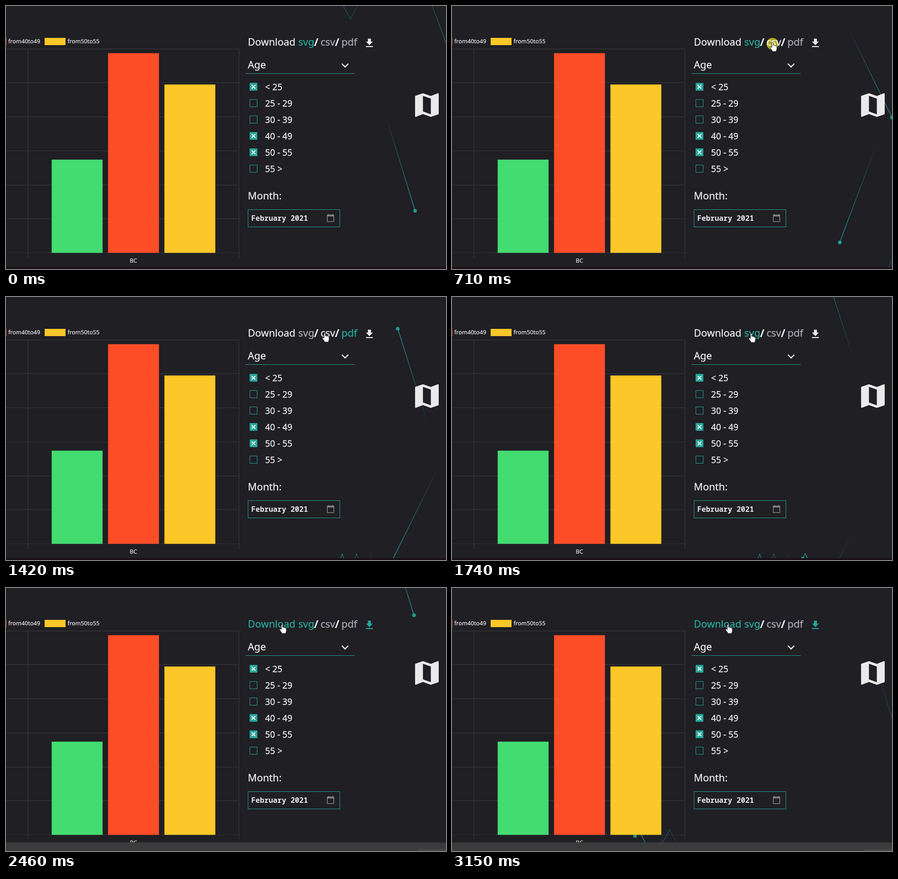
Write an HTML page with a canvas that moves like this. It is 968x578 px and loops after 3.22 s.

```html
<!DOCTYPE html>
<html lang="en">
<head>
<meta charset="utf-8">
<title>Chart download panel</title>
<style>
  html, body { margin: 0; width: 100%; height: 100%; overflow: hidden; background: #1f1f24; }
  canvas, svg { position: absolute; left: 0; top: 0; width: 968px; height: 578px; }
  text { font-family: "Noto Sans", "Open Sans", sans-serif; fill: #ececec; color: #ececec; stroke: currentColor; stroke-width: .35px; white-space: pre; }
  .big { font-size: 22px; }
  .slash { font-size: 24px; font-weight: 600; stroke: none; }
  .item { font-size: 19.2px; }
  .small { font-size: 12.7px; stroke-width: .2px; }
  .month { font: 600 16px "Noto Sans Mono", "DejaVu Sans Mono", monospace; stroke: none; }
  .icon { fill: #ececec; }
  .grid { stroke: #3b3b40; fill: none; }
  .teal { stroke: #26a69a; fill: none; }
  #click { mix-blend-mode: screen; }
</style>
</head>
<body>
<canvas id="trails" width="968" height="578"></canvas>
<svg viewBox="0 0 968 578">
  <path class="grid" d="M0 94.5H513M0 168.5H513M0 243.5H513M0 318.5H513M0 393.5H513M0 467.5H513M48.5 95V553M512.5 95V553"/>
  <path class="grid" d="M0 542.5H513" opacity=".7"/>
  <rect x="100.5" y="337.7" width="112" height="204.8" fill="#43dc71"/>
  <rect x="224.5" y="103.7" width="112" height="438.800" fill="#fd4d27"/>
  <rect x="348.5" y="172.500" width="112" height="370" fill="#fcc728"/>
  <rect x="0" y="70" width="1" height="16" fill="#fd4d27"/>
  <rect x="85" y="70" width="46" height="16" fill="#fcc728"/>
  <text class="small" x="5" y="82">from40to49</text>
  <text class="small" x="135.5" y="82">from50to55</text>
  <text class="small" x="280.5" y="564" text-anchor="middle">BC</text>

  <text class="big" id="dl" x="532" y="87">Download</text>
  <text class="big" id="svg" x="643" y="87">svg</text>
  <text class="slash" x="677.500" y="88">/</text>
  <text class="big" id="csv" x="692" y="87">csv</text>
  <text class="slash" x="723.500" y="88">/</text>
  <text class="big" id="pdf" x="738" y="87">pdf</text>
  <path class="icon" id="arrow" transform="translate(786.400 68.500) scale(1.090)" d="M19 9h-4V3H9v6H5l7 7 7-7zM5 18v2h14v-2H5z"/>

  <text class="big" x="532" y="136.500">Age</text>
  <path class="icon" transform="translate(730 114.500) scale(1.330)" d="M16.590 8.590L12 13.170 7.410 8.590 6 10l6 6 6-6z"/>
  <path class="teal" d="M527 148.500H767"/>
  <g id="ages"></g>

  <text class="big" x="532" y="424.500">Month:</text>
  <rect class="teal" x="532.500" y="447.500" width="202" height="38"/>
  <text class="month" x="539.500" y="472">February 2021</text>
  <path fill="#858585" transform="translate(704.400 456.200) scale(.8)" d="M20 3h-1V1h-2v2H7V1H5v2H4c-1.100 0-2 .9-2 2v16c0 1.100.9 2 2 2h16c1.100 0 2-.9 2-2V5c0-1.100-.9-2-2-2zm0 18H4V8h16v13z"/>

  <path id="map" fill="#e9e9e9" d="M20.500 3l-.16.03L15 5.100 9 3 3.360 4.900c-.21.07-.36.25-.36.48V20.500c0 .28.22.5.5.5l.16-.03L9 18.900l6 2.100 5.640-1.900c.21-.07.36-.25.36-.48V3.500c0-.28-.22-.5-.5-.5zM15 19l-6-2.110V5l6 2.110V19z"/>

  <rect y="574" width="968" height="4" fill="#1a1016"/>
  <g id="shelf">
    <rect y="559" width="968" height="19" fill="#3b3b3b"/>
    <rect x="907" y="573" width="61" height="5" fill="#444"/>
  </g>

  <circle id="click" cx="5" cy="3" r="13" fill="#a59d00"/>
  <g id="cursor">
    <path fill="#fff" stroke="#16161a" stroke-width=".9" transform="scale(.95)" d="M4 1.500C4-.5 7-.5 7 1.500V7c1-1 3-.8 3 .8 1-.8 3-.4 3 1 1-.5 2.500 0 2.500 1.500V15c0 2-1.500 3-1.500 6H5.500c0-2.500-5-6.500-5.500-9C0 10 2 10 4 12z"/>
  </g>
</svg>
<script>
const LOOP = 3220, TICKS = 41, TICK = LOOP / TICKS;
const SPEED = 41, TAIL = 235;          // pixels per tick, trail length
const TEAL = '#26a69a', WHITE = '#ececec', GRAY = '#a8a8b4';
const $ = id => document.getElementById(id);
const ctx = $('trails').getContext('2d');

// age check boxes
$('ages').innerHTML = ['&lt; 25', '25 - 29', '30 - 39', '40 - 49', '50 - 55', '55 &gt;'].map((label, i) => {
  const on = [0, 3, 4].includes(i), y = 170 + 36 * i;
  return `<rect x="536.5" y="${y - .5}" width="16" height="16" stroke="${TEAL}" fill="${on ? TEAL : 'none'}"/>` +
    (on ? `<path d="M540.500 ${y + 3.5}l8 8m0-8l-8 8" stroke="#fff" stroke-width="2.200"/>` : '') +
    `<text class="item" x="570" y="${y + 14.7}">${label}</text>`;
}).join('');

// A trail's head is at points[0] at tick `start` and runs along the points until tick `end`.
const trail = (start, points, end = TICKS) => ({ start, points, end });

// Straight trail given by its head position at one tick and a direction.
function straight(tick, x, y, dx, dy) {
  const k = SPEED / Math.hypot(dx, dy), at = n => [x + dx * k * n, y + dy * k * n];
  return trail(tick - 20, [at(-20), at(20)]);
}

function zigzag(start, x, top, half, drop, count, end) {
  const points = [];
  for (let i = 0; i < count; i++) points.push([x - i * half, top + (i % 2 ? 0 : drop)]);
  return trail(start, points, end);
}

const trails = [
  trail(-6.3, [[806, -60], [758, 28], [660, -144]]),
  straight(0, 900, 450, 68, 220),
  straight(0, 994, 150, 30, 80),
  straight(9, 968, 245, 100, 204),
  straight(9, 853, 519.5, -81, 215),
  straight(9, 917, 701, -14, 40),
  straight(13, 924, 265, -62, -195),
  straight(13, 941, 395, -91, 183),
  straight(33, 922, 138, 43, 138),
  zigzag(11.8, 818.5, 565, 15.75, 37, 24, 31),
  trail(20.6, [[797, 604], [777, 564], [757, 604], [737, 566], [719, 603], [702, 576.5], [690, 600]]),
  zigzag(34.3, 513, 531, 34.3, 64, 6),
  zigzag(34, 488, 531, 16, 34, 3)
];

function drawTrail({ start, points }, n) {
  const head = (n - start) * SPEED;
  const alpha = s => Math.max(0, .85 * (1 - (head - s) / TAIL));
  let s = 0;
  for (let i = 1; i < points.length; i++) {
    const [ax, ay] = points[i - 1], [bx, by] = points[i];
    const len = Math.hypot(bx - ax, by - ay);
    const from = Math.max(s, head - TAIL), to = Math.min(s + len, head);
    if (to > from) {
      const at = d => [ax + (bx - ax) * (d - s) / len, ay + (by - ay) * (d - s) / len];
      const p = at(from), q = at(to), fade = ctx.createLinearGradient(...p, ...q);
      fade.addColorStop(0, `rgba(38,166,154,${alpha(from)})`);
      fade.addColorStop(1, `rgba(38,166,154,${alpha(to)})`);
      ctx.strokeStyle = fade;
      ctx.beginPath();
      ctx.moveTo(...p);
      ctx.lineTo(...q);
      ctx.stroke();
      if (to === head) {
        ctx.beginPath();
        ctx.arc(...q, 4, 0, 7);
        ctx.fill();
      }
    }
    s += len;
  }
}

// [tick, value]: the last entry reached holds
const held = (list, n) => list.filter(([t]) => t <= n).pop()[1];
const selected = [[0, 'svg'], [10, 'csv'], [15, 'pdf'], [21, 'svg']];
const hovered = [[0, ''], [4, 'dl'], [6, 'svg'], [8, 'csv'], [11, ''], [12, 'pdf'], [17, 'csv'], [19, 'svg'], [24, ''], [27, 'dl']];
const clicks = [9, 10, 14, 15, 20, 21, 29, 30];
const path = [[3, 570, 96], [5, 622, 92], [7, 680, 90], [9, 707, 90], [10, 707, 90], [13, 744, 88], [15, 752, 88],
  [16, 745, 88], [18, 703, 89], [20, 662, 89], [22, 660, 90], [26, 632, 93], [29, 609, 90], [TICKS, 609, 90]];

function cursorAt(n) {
  const i = Math.max(1, path.findIndex(p => p[0] >= n));
  const [t0, x0, y0] = path[i - 1], [t1, x1, y1] = path[i];
  const k = (n - t0) / (t1 - t0);
  return [x0 + (x1 - x0) * k - 7, y0 + (y1 - y0) * k - 10];
}

const show = (id, on) => $(id).style.display = on ? '' : 'none';
const paint = (id, color) => $(id).style.fill = $(id).style.color = color;

function draw(n) {
  ctx.clearRect(0, 0, 968, 578);
  ctx.lineWidth = 1.6;
  ctx.lineCap = 'round';
  ctx.fillStyle = '#229c8e';
  for (const t of trails) if (n < t.end) drawTrail(t, n);

  const sel = held(selected, n), hover = held(hovered, n);
  for (const id of ['svg', 'csv', 'pdf']) paint(id, id === sel ? TEAL : id === hover ? WHITE : GRAY);
  for (const id of ['dl', 'arrow']) paint(id, hover === 'dl' ? TEAL : WHITE);

  const shelf = n >= 31;
  show('shelf', shelf);
  $('map').setAttribute('transform', `translate(891.3 ${shelf ? 152 : 183}) scale(2.889)`);

  show('cursor', n >= 3);
  show('click', clicks.includes(n));
  if (n >= 3) {
    for (const id of ['cursor', 'click']) $(id).setAttribute('transform', `translate(${cursorAt(n)})`);
  }
}

const begin = performance.now();
let last = -1;
function frame() {
  const t = (performance.now() - begin) % LOOP;
  const n = Math.min(TICKS - 1, Math.floor((t + 9) / TICK));
  if (n !== last) draw(last = n);
  requestAnimationFrame(frame);
}
frame();
</script>
</body>
</html>
```
